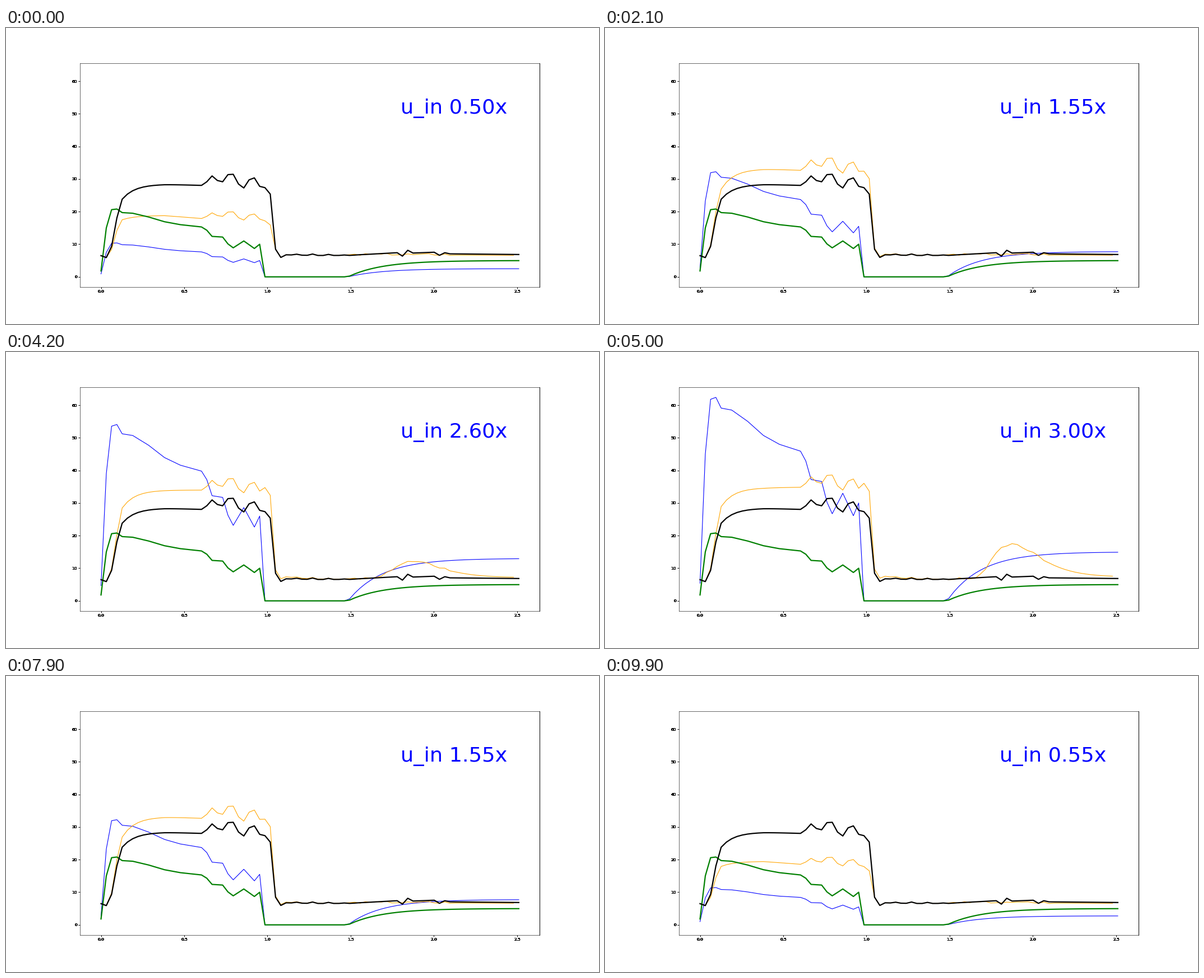
These frames come from a looping animation (1058x529 px, 10 s). A matplotlib script:

```python
import numpy as np
import matplotlib.pyplot as plt
from matplotlib.animation import FuncAnimation

FRAMES = 100
N = 80
T_END = 2.51
Y_MAX = 62.3
DPI = 52.9
PIXEL = 72 / DPI

t = np.linspace(0, T_END, N)
k = np.arange(N)
phase = np.random.default_rng(4).uniform(0, 2 * np.pi, N)


def through(*points):
    return np.interp(k, *zip(*points))


# Control signal: inflow, pause, exponential recovery.
inflow = through((0, 1.8), (1, 15), (2, 20.6), (3, 20.8), (4, 19.7), (6, 19.5),
                 (9, 18.35), (12, 16.9), (15, 16), (19, 15.3), (20, 14.3),
                 (21, 12.4), (23, 12.2), (24, 10.1), (25, 8.9), (27, 11),
                 (29, 8.7), (30, 10), (31, 0))
u_in = inflow + 5 * (1 - np.exp(-0.156 * np.maximum(k - 46.7, 0)))

# Bumps on the plateau, shared by measured and predicted pressure.
ripple = np.zeros(N)
ripple[20:31] = [1.1, 2.9, 1.5, 1.1, 3.3, 3.4, 0.4, -0.8, 1.7, 2.3, -0.3]

rest = through((33, 8.5), (34, 5.9), (35, 6.8), (47, 6.6), (56, 7.4),
               (57, 6.35), (58, 8.15), (59, 7.3), (63, 7.55), (64, 6.6),
               (65, 7.4), (66, 7.05), (79, 6.85))
rest += 0.28 * np.cos(2 * np.pi * (k - 40) / 3) * np.exp(-((k - 40.5) / 5) ** 2)

# Per gain: plateau level, initial deficit, droop, ripple scale, late bump.
gains = np.array([0.5, 1.0, 1.55, 2.2, 3.0])
shape = np.array([[18.8, 1.3, 0.13, 0.6, 0],
                  [28.4, 4.6, 0.05, 1.0, 0],
                  [33.1, 6.2, 0.06, 1.1, 0],
                  [33.4, 5.3, 0.02, 1.0, 1.2],
                  [34.7, 5.8, -0.02, 1.1, 9.6]])

# Slopes for a monotone cubic blend between the gains.
step = np.diff(gains)
sec = np.diff(shape, axis=0) / step[:, None]
prod = sec[:-1] * sec[1:]
inner = np.where(prod > 0, 2 * prod / np.where(prod > 0, sec[:-1] + sec[1:], 1), 0)
slope = np.vstack([0.55 * sec[0], inner, sec[-1]])


def blend(gain):
    j = min(np.searchsorted(gains, gain, side="right") - 1, len(step) - 1)
    h = step[j]
    s = (gain - gains[j]) / h
    return ((1 + 2 * s) * (1 - s) ** 2 * shape[j]
            + s * (1 - s) ** 2 * h * slope[j]
            + s * s * (3 - 2 * s) * shape[j + 1]
            + s * s * (s - 1) * h * slope[j + 1])


def breath(gain, tail):
    level, deficit, droop, swell, _ = blend(gain)
    y = level - deficit * np.exp(-0.42 * (k - 4)) - droop * np.clip(k - 12, 0, 7)
    y += swell * ripple
    y[:4] = 6.5, 5.9, 0.1 * level + 6.5, 0.4 * level + 6.7
    hold = 0.945 + 0.03 * gain
    y[31] *= hold
    y[32] *= hold - 0.07
    y[33:] = tail[33:]
    return y


def predict(gain):
    bump = blend(gain)[4]
    x = np.maximum(k - 51.5, 0) / 7.5
    calm = through((47, 6.7), (52, 6.95), (62, 6.95), (67, 6.65), (79, 6.6))
    jitter = 0.25 * np.sin(phase + 6 * gain) * (k < 67)
    tail = np.where(k < 47, rest, calm + jitter)
    tail += bump * x ** 3 * np.exp(3 - 3 * x)
    tail += 0.5 * max(gain - 1.5, 0) * np.clip((k - 51) / 6, 0, 1)
    tail += 0.5 * max(gain - 1, 0) * np.exp(-(k - 34) / 4)
    return breath(gain, tail)


pressure = breath(1.0, rest)

plt.rcParams["font.family"] = "DejaVu Sans"
fig = plt.figure(figsize=(20, 10), dpi=DPI, facecolor="white")
ax = fig.add_axes([0.125, 0.125, 0.775, 0.755])
ax.set_xlim(-0.05 * T_END, 1.05 * T_END)
ax.set_ylim(-0.05 * Y_MAX, 1.05 * Y_MAX)
ax.set_xticks(np.arange(0, 2.6, 0.5))
ax.set_yticks(np.arange(0, 61, 10))
ax.tick_params(width=PIXEL, labelbottom=False, labelleft=False)
ax.spines["right"].set_linewidth(PIXEL)


def heavy_text(x, y, s, placing):
    """Repeat a tick label so that its soft edges turn solid."""
    transform, va, ha = placing
    for _ in range(8):
        ax.text(x, y, s, transform=transform, va=va, ha=ha, fontsize=10)


for v in ax.get_xticks():
    heavy_text(v, 0, f"{v:.1f}", ax.get_xaxis_text1_transform(7))
for v in ax.get_yticks():
    heavy_text(0, v, f"{v:.0f}", ax.get_yaxis_text1_transform(7))

blue, = ax.plot(t, u_in, color="blue", lw=1.5)
orange, = ax.plot(t[:-1], pressure[:-1], color="orange", lw=1.5)
ax.plot(t, u_in, color="green", lw=3)
ax.plot(t, pressure, color="black", lw=3)
label = ax.text(1.8, 50, "", fontsize=50, color="blue")


def update(i):
    gain = 0.5 + 0.05 * min(i, FRAMES - i)
    blue.set_ydata(gain * u_in)
    orange.set_ydata(predict(gain)[:-1])
    label.set_text(f"u_in {gain:.2f}x")
    return blue, orange, label


anim = FuncAnimation(fig, update, frames=FRAMES, interval=100,
                     repeat=True, repeat_delay=0, blit=False)
plt.show()
```
